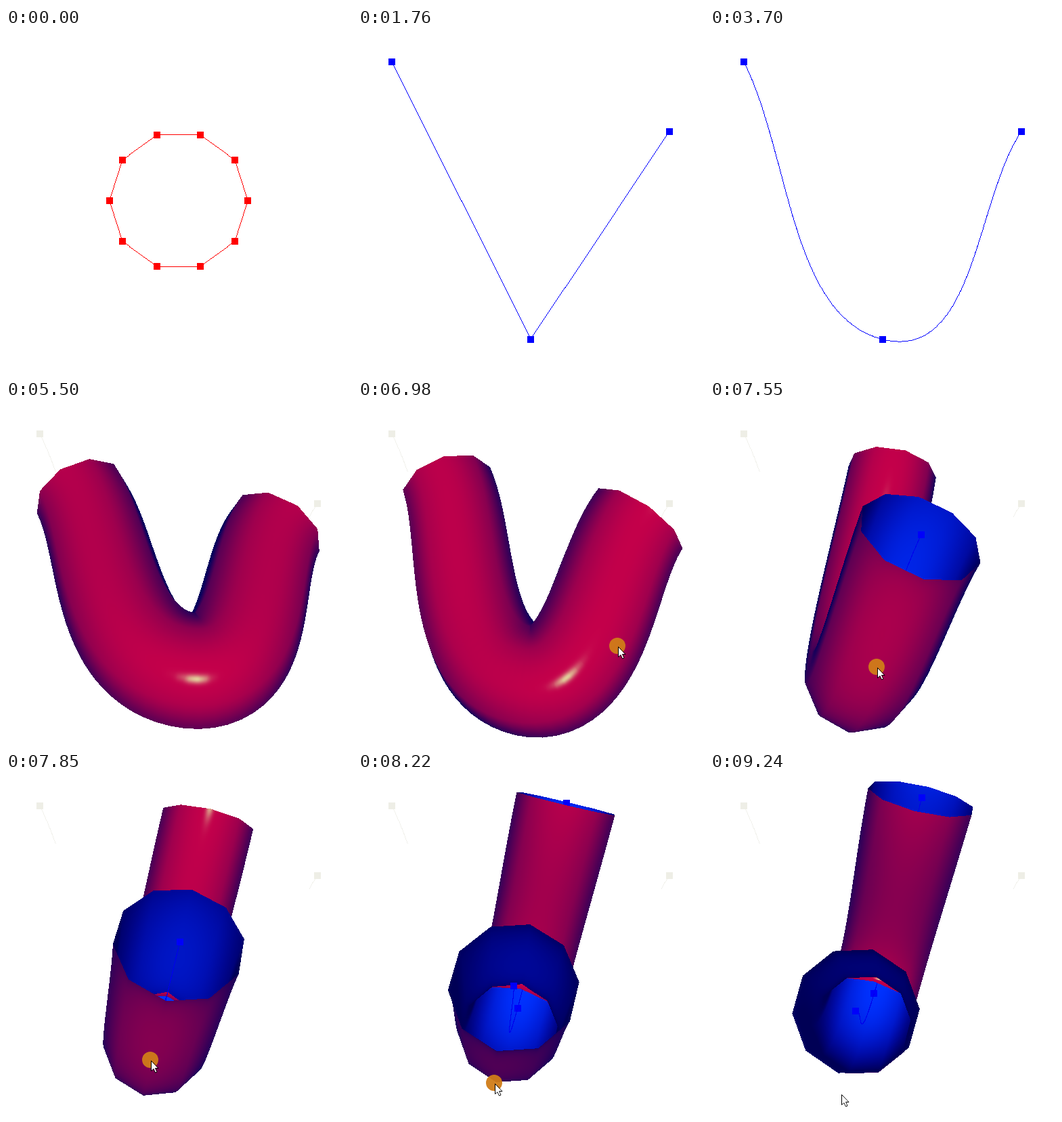
An HTML page with a canvas that plays this animation: 511 by 508 pixels, repeating every 9390 ms.

```html
<!DOCTYPE html>
<html lang="en">
<head>
<meta charset="utf-8">
<title>Swept tube</title>
<style>
  html, body { margin: 0; width: 100%; height: 100%; overflow: hidden; background: #fff; }
  canvas { display: block; }
</style>
</head>
<body>
<canvas id="stage" width="511" height="508"></canvas>
<script>
const W = 511, H = 508, MID = 255, UNIT = 204.8;
const LOOP = 9390, CONTROL = 1760, CURVE = 3700, TUBE = 5500, DRAG = 5880, RELEASE = 8990, LEAVE = 9240;
const STEP = 78.3, STEPS = 35;
const FOCAL = 764, DIST = 5, RADIUS = 0.5, SIDES = 10, RINGS = 64;

const ctx = document.getElementById('stage').getContext('2d', { willReadFrequently: true });

// Knots with their Hermite tangents.
const knots = [
  { p: [-1, 1], m: [1, -2] },
  { p: [0, -1], m: [2, -0.5] },
  { p: [1, 0.5], m: [1, 1.5] }
];

function curve(u) {
  const i = u < 1 ? 0 : 1, t = u - i, a = knots[i], b = knots[i + 1];
  const blend = (h0, g0, h1, g1) =>
    [0, 1].map(k => h0 * a.p[k] + g0 * a.m[k] + h1 * b.p[k] + g1 * b.m[k]);
  const t2 = t * t, t3 = t2 * t;
  return {
    pos: blend(2 * t3 - 3 * t2 + 1, t3 - 2 * t2 + t, 3 * t2 - 2 * t3, t3 - t2),
    dir: blend(6 * t2 - 6 * t, 3 * t2 - 4 * t + 1, 6 * t - 6 * t2, 3 * t2 - 2 * t)
  };
}

/* ---- flat drawing ---- */

const flat = ([x, y]) => [MID + x * UNIT, MID - y * UNIT];

function line([x0, y0], [x1, y1]) {
  const n = Math.max(1, Math.ceil(Math.max(Math.abs(x1 - x0), Math.abs(y1 - y0))));
  for (let i = 0; i <= n; i++) {
    ctx.fillRect(Math.floor(x0 + (x1 - x0) * i / n), Math.floor(y0 + (y1 - y0) * i / n), 1, 1);
  }
}

function path(points, color) {
  ctx.fillStyle = color;
  for (let i = 1; i < points.length; i++) line(points[i - 1], points[i]);
}

function dots(points, color) {
  ctx.fillStyle = color;
  for (const [x, y] of points) ctx.fillRect(Math.round(x) - 5, Math.round(y) - 5, 10, 10);
}

function sample(from, to, n) {
  return Array.from({ length: n + 1 }, (_, i) => flat(curve(from + (to - from) * i / n).pos));
}

function clear() {
  ctx.fillStyle = '#fff';
  ctx.fillRect(0, 0, W, H);
}

const knotDots = knots.map(k => flat(k.p));

function drawPolygon() {
  const pts = Array.from({ length: SIDES + 1 }, (_, i) => {
    const a = i * 2 * Math.PI / SIDES;
    return flat([RADIUS * Math.cos(a), RADIUS * Math.sin(a)]);
  });
  path(pts, '#f00');
  dots(pts, '#f00');
}

function drawCurve(smooth) {
  path(smooth ? sample(0, 2, 120) : knotDots, '#00f');
  dots(knotDots, '#00f');
}

/* ---- swept surface ---- */

const mesh = Array.from({ length: RINGS + 1 }, (_, i) => {
  const { pos, dir } = curve(2 * i / RINGS), len = Math.hypot(...dir);
  const nx = -dir[1] / len, ny = dir[0] / len;
  return Array.from({ length: SIDES }, (_, j) => {
    const a = j * 2 * Math.PI / SIDES, c = Math.cos(a), s = Math.sin(a);
    const n = [c * nx, c * ny, s];
    return { n, p: [pos[0] + RADIUS * n[0], pos[1] + RADIUS * n[1], RADIUS * s] };
  });
});

const depth = new Float32Array(W * H);
let image, data;

const dot = (a, b) => a[0] * b[0] + a[1] * b[1] + a[2] * b[2];
const unit = a => { const l = Math.hypot(...a); return a.map(v => v / l); };
const mix = (a, b, t) => a.map((v, i) => v + (b[i] - v) * t);

// Distant light from the viewer's side, slightly above; the viewer counts as distant too.
const light = unit([0, 0.11, 1]);
const half = unit([light[0], light[1], light[2] + 1]);

// Columns of the rotation: where the model's x, y and z axes point.
function basis(x, y) {
  const ex = unit(x), d = dot(ex, y);
  const ey = unit(y.map((v, i) => v - d * ex[i]));
  const ez = [ex[1] * ey[2] - ex[2] * ey[1], ex[2] * ey[0] - ex[0] * ey[2], ex[0] * ey[1] - ex[1] * ey[0]];
  return [ex, ey, ez];
}

const turn = (m, v) => [0, 1, 2].map(i => m[0][i] * v[0] + m[1][i] * v[1] + m[2][i] * v[2]);

function project(m, v) {
  const p = turn(m, v), near = 1 / (DIST - p[2]);
  return { x: MID + p[0] * FOCAL * near, y: MID - p[1] * FOCAL * near, near };
}

function put(x, y, near, r, g, b) {
  if (x < 0 || y < 0 || x >= W || y >= H) return;
  const i = y * W + x;
  if (near <= depth[i]) return;
  depth[i] = near;
  data[4 * i] = r;
  data[4 * i + 1] = g;
  data[4 * i + 2] = b;
}

// Red outside, blue inside.
function shade(x, y, near, normal, outside) {
  const n = unit(normal), d = Math.max(0, outside ? dot(n, light) : -dot(n, light));
  if (outside) {
    const s = Math.pow(Math.max(0, dot(n, half)), 380);
    put(x, y, near, 5 + 192 * d + 28 * s, 205 * s, 92 - 18 * d + 80 * s);
  } else {
    put(x, y, near, 0, 50 * d * d, 85 + 170 * d);
  }
}

function triangle(a, b, c) {
  const area = (b.x - a.x) * (c.y - a.y) - (b.y - a.y) * (c.x - a.x);
  if (!area) return;
  const x0 = Math.floor(Math.min(a.x, b.x, c.x)), x1 = Math.ceil(Math.max(a.x, b.x, c.x));
  const y0 = Math.floor(Math.min(a.y, b.y, c.y)), y1 = Math.ceil(Math.max(a.y, b.y, c.y));
  for (let y = y0; y <= y1; y++) {
    for (let x = x0; x <= x1; x++) {
      const px = x + 0.5, py = y + 0.5;
      const u = ((px - a.x) * (c.y - a.y) - (py - a.y) * (c.x - a.x)) / area;
      const v = ((b.x - a.x) * (py - a.y) - (b.y - a.y) * (px - a.x)) / area;
      const w = 1 - u - v;
      if (u < 0 || v < 0 || w < 0) continue;
      const at = k => a.n[k] * w + b.n[k] * u + c.n[k] * v;
      shade(x, y, a.near * w + b.near * u + c.near * v, [at(0), at(1), at(2)], area < 0);
    }
  }
}

function drawTube(m) {
  clear();
  path(sample(0, 0.125, 8), '#f1f1ec');
  path(sample(1.94, 2, 4), '#f1f1ec');
  dots([knotDots[0], knotDots[2]], '#eeeee6');
  image = ctx.getImageData(0, 0, W, H);
  data = image.data;
  depth.fill(0);

  const pts = mesh.map(ring => ring.map(q => Object.assign(project(m, q.p), { n: turn(m, q.n) })));
  for (let i = 0; i < RINGS; i++) {
    for (let j = 0; j < SIDES; j++) {
      const k = (j + 1) % SIDES;
      triangle(pts[i][j], pts[i][k], pts[i + 1][j]);
      triangle(pts[i][k], pts[i + 1][k], pts[i + 1][j]);
    }
  }
  for (let i = 0; i <= 1000; i++) {
    const q = project(m, [...curve(i / 500).pos, 0]);
    put(Math.floor(q.x), Math.floor(q.y), q.near, 0, 0, 235);
  }
  for (const k of knots) {
    const q = project(m, [...k.p, 0]);
    for (let i = 0; i < 100; i++) {
      put(Math.round(q.x) - 5 + i % 10, Math.round(q.y) - 5 + Math.floor(i / 10), q.near + 1e-5, 0, 0, 250);
    }
  }
  ctx.putImageData(image, 0, 0);
}

/* ---- dragging ---- */

const poses = [
  { at: 0, x: [1, 0.02, -0.035], y: [-0.047, 0.832, -0.555], hand: [418, 337], ease: p => p ** 4 },
  { at: 14, x: [0.969, 0.009, 0.246], y: [0.036, 0.932, -0.36], hand: [383, 363], ease: p => p },
  { at: 21, x: [0.163, -0.184, 0.969], y: [0.27, 0.95, 0.153], hand: [246, 394], ease: p => p },
  { at: 25, x: [-0.095, -0.417, 0.904], y: [0.208, 0.878, 0.431], hand: [213, 425], ease: p => 1 - (1 - p) ** 1.8 },
  { at: STEPS, x: [-0.26, -0.793, 0.551], y: [0.09, 0.53, 0.844], hand: [193, 481] }
];

function poseAt(step) {
  let i = 0;
  while (i < poses.length - 2 && step >= poses[i + 1].at) i++;
  const a = poses[i], b = poses[i + 1];
  const p = a.ease((step - a.at) / (b.at - a.at));
  return { turn: basis(mix(a.x, b.x, p), mix(a.y, b.y, p)), hand: mix(a.hand, b.hand, p).map(Math.round) };
}

function drawPointer(x, y, pressed) {
  if (pressed) {
    ctx.fillStyle = 'rgba(208,124,24,.95)';
    ctx.beginPath();
    ctx.arc(x, y, 12, 0, 2 * Math.PI);
    ctx.fill();
  }
  ctx.save();
  ctx.translate(x + 1.5, y + 1.5);
  ctx.fillStyle = '#fff';
  ctx.strokeStyle = '#000';
  ctx.lineWidth = 1;
  ctx.stroke(new Path2D('M0 0V15L3.5 12L6 17.5L8.5 16.5L6 11H10.5Z'));
  ctx.fill(new Path2D('M.5 1.2V14L3.7 11.2L6.3 16.8L7.8 16.2L5.3 10.5H9.3Z'));
  ctx.restore();
}

/* ---- timeline ---- */

function stateAt(t) {
  if (t < CONTROL) return 'polygon';
  if (t < CURVE) return 'control';
  if (t < TUBE) return 'curve';
  if (t < DRAG) return 'tube';
  if (t >= LEAVE) return 'leave';
  if (t >= RELEASE) return 'release';
  return Math.min(STEPS, Math.floor((t - DRAG) / STEP));
}

function draw(state) {
  clear();
  if (state === 'polygon') return drawPolygon();
  if (state === 'control' || state === 'curve') return drawCurve(state === 'curve');
  if (state === 'tube') return drawTube(poseAt(0).turn);
  const dragging = typeof state === 'number';
  const { turn, hand: [x, y] } = poseAt(dragging ? state : STEPS);
  drawTube(turn);
  drawPointer(x, state === 'leave' ? y - 6 : y, dragging);
}

let start, shown;

function tick(now) {
  if (start === undefined) start = now;
  const state = stateAt((now - start) % LOOP);
  if (state !== shown) draw(shown = state);
  requestAnimationFrame(tick);
}
requestAnimationFrame(tick);
</script>
</body>
</html>
```
